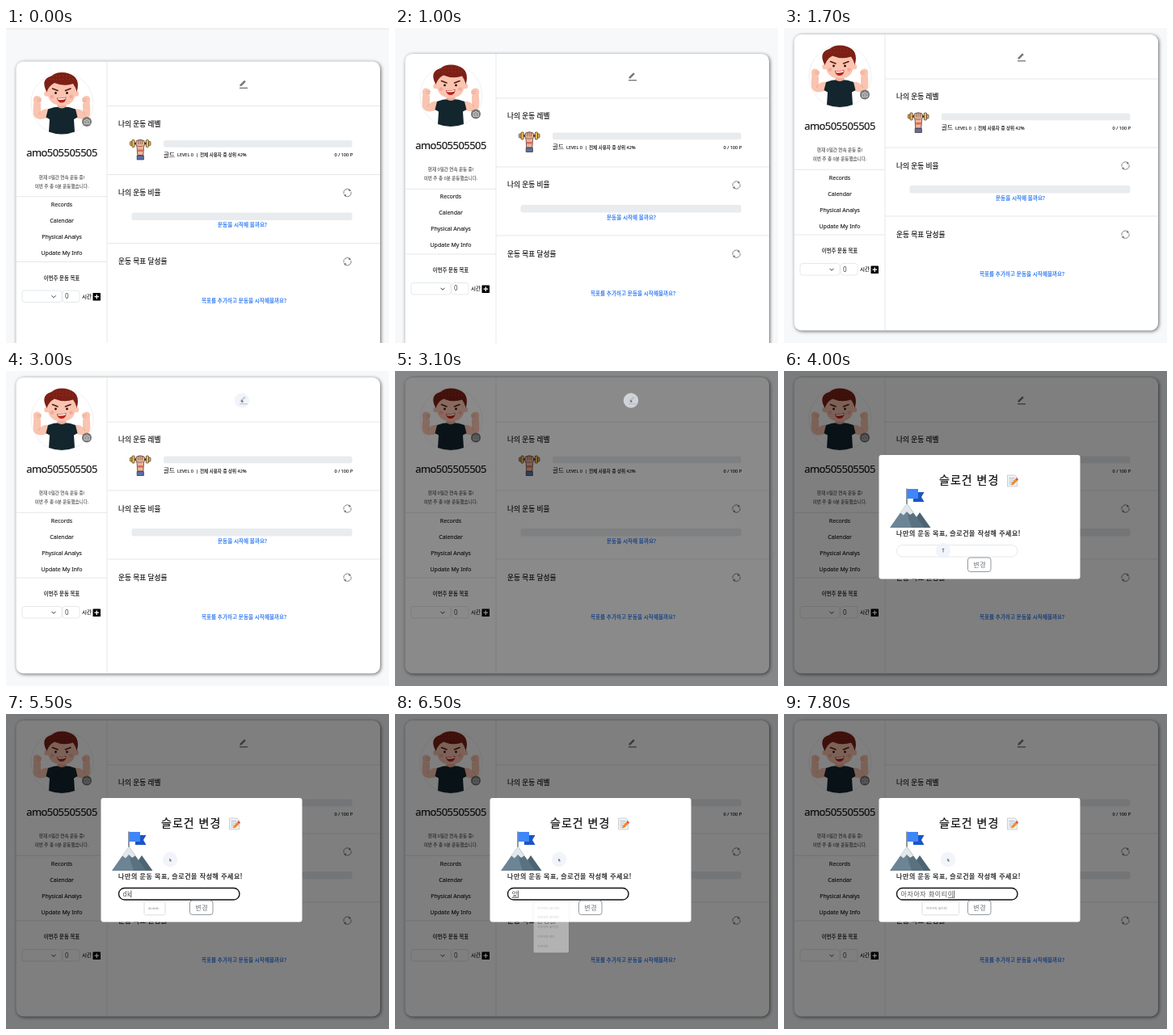
Write an HTML page that moves like this. It is 474 px wide and 390 px high and loops after 8000 ms.

```html
<!DOCTYPE html>
<html lang="ko">
<head>
<meta charset="utf-8">
<style>
  html, body { margin: 0; height: 100%; overflow: hidden; background: #f6f8fa; }
  svg { display: block; width: 474px; height: 390px; }
  text { font-family: "Noto Sans", "Noto Sans CJK KR", "Noto Sans CJK JP", sans-serif; fill: #111; white-space: pre; }
  .mid { text-anchor: middle; }
  .menu { font-size: 7px; stroke: #111; stroke-width: .1px; }
  .small { font-size: 5.55px; stroke: #111; stroke-width: .12px; }
  .note { font-size: 5.55px; stroke: #555; stroke-width: .1px; }
  .note text { fill: #555; }
  .head { font-size: 8.7px; font-weight: 500; stroke: #111; stroke-width: .15px; }
  .link { font-size: 6.6px; fill: #1a6cf0; stroke: #1a6cf0; stroke-width: .15px; }
  .bar { fill: #e9ecef; }
  .field { fill: #fff; stroke: #dee2e6; stroke-width: .8px; }
  .rule { fill: none; stroke: #e4e5e7; stroke-width: .9px; }
  .spaced { font-size: 8px; letter-spacing: .58px; }
  .hint { font-size: 3.6px; fill: #888; letter-spacing: .15px; }
</style>
</head>
<body>
<svg viewBox="0 0 474 390">
  <defs>
    <g id="refresh">
      <path d="M-4.500 1.200A4.600 4.600 0 0 1 2.900 -3.600M4.500 -1.200A4.600 4.600 0 0 1 -2.900 3.600" fill="none" stroke="#777" stroke-width=".9"/>
      <path d="M2.300 -5.200L4.800 -2.200L1.600 -1.900ZM-2.300 5.200L-4.800 2.200L-1.600 1.900Z" fill="#777"/>
    </g>
    <g id="arm">
      <path d="M35 55Q33 66 34 74Q37 81 46 79L55 77L54 67Q46 66 43 70L43 60Z" fill="#f9c4b0"/>
      <path d="M34 57Q33 51 38 50.500Q44 51 44 56Q43 60.500 38 60Q35 60 34 57Z" fill="#f9c4b0"/>
      <path d="M38 54.500h5.500M38.500 57h4.500M42.500 70q-2 1.500 -2 4" fill="none" stroke="#e59f8c" stroke-width=".7"/>
    </g>
    <g id="weight" fill="#eebc55" stroke="#3b2a22" stroke-width=".7">
      <rect x="153.500" y="107" width="2.500" height="5" rx="1"/>
      <rect x="156" y="105" width="3.200" height="9" rx="1"/>
    </g>
  </defs>

  <g id="page">
    <path class="rule" d="M0 -32.500H474"/>
    <rect x="12.500" y="8" width="450.500" height="366.500" rx="9" fill="#fff"
          style="filter:drop-shadow(1.200px 1.200px 2px rgba(0,0,0,.6))"/>
    <path class="rule" d="M125 8V374M12.500 175.300H125M12.500 256H125M125 63H463M125 148H463M125 233H463"/>

    <circle cx="69.500" cy="60" r="38.500" fill="#fff" stroke="#ececec" stroke-width=".8"/>
    <use href="#arm"/>
    <use href="#arm" transform="matrix(-1 0 0 1 138 0)"/>
    <path d="M52 67Q60 63.500 69 64Q78 63.500 86 67L88.500 77L84 79.500L85 95Q69 101 53 95L54 79.500L49.500 77Z" fill="#13252d"/>
    <path d="M63.500 57h11v7q-5.500 4 -11 0z" fill="#efae9a"/>
    <g fill="#f9c4b0">
      <circle cx="50.500" cy="48" r="3.200"/><circle cx="87" cy="48" r="3.200"/>
      <path d="M51.500 40Q53 30 69 30Q85 30 86 40V48Q84 62.500 69 62.500Q54 62.500 51.500 48Z"/>
    </g>
    <path d="M50.500 46Q42 30 56 26Q65 19 78 23Q93 28 87.500 46Q86.500 40 83 35.500Q72 39.500 60 34.500Q53 38 50.500 46Z" fill="#7c2016"/>
    <path d="M54 30H85M58 26H81" fill="none" stroke="#a8372a" stroke-dasharray="1 3" stroke-width=".9"/>
    <path d="M57.500 41.500l6.500 2.500M73.500 44l6.500 -2.500" fill="none" stroke="#5a1710" stroke-width="1.600" stroke-linecap="round"/>
    <g fill="#2b1512"><circle cx="61.500" cy="47" r="1.400"/><circle cx="75.500" cy="47" r="1.400"/></g>
    <g fill="#f6a89a"><circle cx="57" cy="51.500" r="2.300"/><circle cx="80.500" cy="51.500" r="2.300"/></g>
    <path d="M63 53q6 1 11.500 -1q0 6.500 -5.500 7q-5 0 -6 -6z" fill="#c0201c"/>
    <path d="M64 53.600q5 .8 9.800 -.8l-.3 1.700q-4.500 1.300 -9 .7z" fill="#fff"/>
    <circle cx="100" cy="82.500" r="6" fill="#777"/>
    <path d="M97 80.700h1.700l.7 -1.200h1.400l.7 1.200h1.700v4.600h-6.200z" fill="none" stroke="#fff" stroke-width=".7"/>
    <circle cx="100.100" cy="82.800" r="1.200" fill="none" stroke="#fff" stroke-width=".6"/>

    <text class="mid" x="69" y="125.700" font-size="13" letter-spacing="-.55" stroke="#111" stroke-width=".15">amo505505505</text>
    <g class="mid note">
      <text x="69" y="153">현재 0일간 연속 운동 중!</text>
      <text x="69" y="164">이번 주 총 0분 운동했습니다.</text>
    </g>
    <g class="mid menu">
      <text x="69" y="187.500">Records</text>
      <text x="69" y="207.500">Calendar</text>
      <text x="69" y="227.500">Physical Analys</text>
      <text x="69" y="247.500">Update My Info</text>
    </g>
    <text class="mid" x="69" y="278.300" font-size="6.400" stroke="#111" stroke-width=".15">이번주 운동 목표</text>
    <rect class="field" x="20" y="291.500" width="49" height="14.500" rx="3"/>
    <rect class="field" x="70" y="291.500" width="21" height="14.500" rx="3"/>
    <path d="M56.500 297.800l2.500 2.500l2.500 -2.500" fill="none" stroke="#343a40"/>
    <text x="73" y="301.500" font-size="8" style="fill:#444">0</text>
    <text x="94" y="301.400" font-size="6.500" stroke="#111" stroke-width=".12">시간</text>
    <rect x="107.500" y="294.500" width="9.500" height="9.500" rx=".6"/>
    <path d="M109.500 299.200h5.500M112.250 296.500v5.500" stroke="#fff" stroke-width="1.300"/>

    <path d="M289.500 38.500v-1.800l5.500 -5.400l1.800 1.800l-5.500 5.400z" fill="#777"/>
    <path d="M289 40.800h10" stroke="#666" stroke-width="1.200"/>

    <text class="head" x="139" y="88.300">나의 운동 레벨</text>
    <path d="M158 109.500h17" stroke="#3b2a22" stroke-width="2.500"/>
    <use href="#weight"/>
    <use href="#weight" transform="matrix(-1 0 0 1 332.500 0)"/>
    <path d="M161.500 106q4.500 -2.500 9.500 0q1.500 4 -.5 8l-.6 10h-7.200l-.6 -10q-2.400 -4 -.6 -8z" fill="#ecb59a" stroke="#3b2a22" stroke-width=".7"/>
    <path d="M163.800 105.500v5M166.200 105v5.500M168.600 105.500v5M162.500 112.500q3 1.500 7 0" fill="none" stroke="#3b2a22" stroke-width=".55"/>
    <path d="M162.700 117h7.200v2.500h-7.200z" fill="#d8695c"/>
    <path d="M162.200 124.500h8.200v5h-8.200z" fill="#5a6fa8" stroke="#3b2a22" stroke-width=".7"/>
    <rect class="bar" x="195" y="105.500" width="233.500" height="8.800" rx="2.500"/>
    <text x="195" y="126" font-size="7.600" stroke="#111" stroke-width=".12">골드</text>
    <g class="small">
      <text x="212" y="125.700">LEVEL 0  |</text>
      <text x="240" y="125.700">전체 사용자 중 상위 42%</text>
      <text x="429" y="125.700" text-anchor="end">0 / 100 P</text>
    </g>

    <text class="head" x="139" y="173.500">나의 운동 비율</text>
    <use href="#refresh" x="422.500" y="170.500"/>
    <rect class="bar" x="155.500" y="195" width="273" height="9.500" rx="2.500"/>
    <text class="mid link" x="292.500" y="212.600">운동을 시작해 볼까요?</text>

    <text class="head" x="139" y="258.700">운동 목표 달성률</text>
    <use href="#refresh" x="422.500" y="255.700"/>
    <text class="mid link" x="294.500" y="306.700">목표를 추가하고 운동을 시작해볼까요?</text>
  </g>

  <rect id="dim" width="474" height="390"/>

  <g id="modal">
    <rect x="117.500" y="104" width="249" height="153.500" rx="3" fill="#fff"/>
    <text x="192" y="140" font-size="14" letter-spacing="1.050" stroke="#111" stroke-width=".25">슬로건 변경</text>
    <path d="M276.500 129h9.500l2.500 2.500v11.500h-12z" fill="#f1f3f5" stroke="#b9c0c8" stroke-width=".7"/>
    <path d="M278.500 132.500h7M278.500 135h7M278.500 137.500h4M278.500 140h3" stroke="#8fa3b8" stroke-width=".7"/>
    <path d="M281 141.500l.8 -3l6 -6.300l2.300 2.200l-6 6.300z" fill="#f28c28"/>
    <path d="M286.500 133.500l1.300 -1.300l2.300 2.200l-1.300 1.300z" fill="#e0455e"/>

    <path d="M152 145.500V168" stroke="#54606b" stroke-width="1.300"/>
    <path d="M160 150h13.500l-3.500 6l3.500 6h-13.500z" fill="#1c55c4"/>
    <path d="M152.500 146h13.500v12h-13.500z" fill="#3f86fa"/>
    <path d="M155 194L168 175L181.500 194Z" fill="#4d6472"/>
    <path d="M131 194L152 164L173 194Z" fill="#6d8494"/>
    <path d="M152 164L173 194H158L154 182Z" fill="#5a7180"/>
    <path d="M152 164L160 175.500L156 178L152 174L148 178.500L144 175.500Z" fill="#e2e8ec"/>

    <text class="spaced" x="139" y="204.200" stroke="#111" stroke-width=".2">나만의 운동 목표, 슬로건을 작성해 주세요!</text>
    <rect id="input" x="139.500" y="215.500" width="149.500" height="14.500" rx="7.250" fill="#fff"/>
    <text id="typed" class="spaced" x="144.500" y="225.800" style="fill:#555"><tspan id="done"></tspan><tspan id="composing" text-decoration="underline"></tspan></text>
    <path id="caret" stroke="#222" stroke-width=".7"/>
    <rect x="227.500" y="231" width="28.500" height="17.500" rx="3" fill="#fff" stroke="#868e96" stroke-width=".9"/>
    <text class="spaced mid" x="242.200" y="242.800" style="fill:#6c757d">변경</text>
  </g>

  <g id="popup">
    <rect id="popupBox" x="171.500" y="232.500" rx="1" fill="#fff" style="filter:drop-shadow(0 .5px 1px rgba(0,0,0,.3))"/>
    <g id="hints"></g>
  </g>

  <g id="cursor">
    <circle r="9.200" fill="#ebf0fa" fill-opacity=".72"/>
    <path id="arrow" d="M-.8 -1.500L2.300 1.400L1 1.500L1.700 3L.8 3.300L.2 1.800L-.8 2.600Z" fill="#555" stroke="#fff" stroke-width=".3"/>
    <path id="beam" d="M-1.200 -2q1.200 0 1.200 .8q0 -.8 1.200 -.8M0 -1.500V2.500" fill="none" stroke="#444" stroke-width=".7"/>
  </g>
</svg>
<script>
  const LOOP = 8000, STEP = 100;
  const $ = id => document.getElementById(id);
  const set = (id, attrs) => { for (const key in attrs) $(id).setAttribute(key, attrs[key]); };
  const progress = (t, from, to) => Math.min(1, Math.max(0, (t - from) / (to - from)));
  const smooth = p => p * p * (3 - 2 * p);
  const latest = (list, t) => list.filter(([start]) => t >= start).pop();

  // [start, finished text, syllable being composed]
  const typing = [
    [0, '', ''], [4700, 'd', ''], [4900, 'dk', ''], [5600, 'd', ''], [5700, '', ''],
    [6200, '', 'ㅇ'], [6300, '', '아'], [6400, '', '앚'], [6600, '아', '자'],
    [6700, '아자', '아'], [6900, '아자', '앚'], [7000, '아자아', '자'], [7100, '아자아자 ', ''],
    [7400, '아자아자 ', '화'], [7500, '아자아자 ', '황'], [7600, '아자아자 화', '이'],
    [7700, '아자아자 화이', '티'], [7800, '아자아자 화이티', '이']
  ];
  // [start, opacity, width, hints]
  const history = ['아자아자 (화이팅)', '아자아자 화이팅!!', '아자아자 화이팅!', '아자아자 화이', '아자아자'];
  const popups = [
    [0, 0, 25, []], [4700, 1, 25, ['dkdkdk']], [5700, 1, 43.5, history],
    [6500, .4, 43.5, history], [6600, .15, 43.5, history], [6700, 0, 43.5, history],
    [7000, 1, 44.5, ['아자아자 화이팅!']]
  ];
  // [start, end, from, to]
  const moves = [
    [2200, 2900, [300, 250], [292, 36.5]],
    [3400, 3900, [292, 36.5], [197, 222]],
    [4300, 4700, [197, 222], [203, 180]]
  ];

  function drawCursor(t) {
    const [start, end, from, to] = latest(moves, t) || moves[0];
    const p = smooth(progress(t, start, end));
    const [x, y] = from.map((v, i) => v + (to[i] - v) * p);
    const overInput = y > 214 && t > 3400;
    set('cursor', { transform: `translate(${x} ${y})`, opacity: progress(t, 2100, 2500) });
    set('arrow', { opacity: overInput ? 0 : 1 });
    set('beam', { opacity: overInput ? 1 : 0 });
  }

  function drawInput(t) {
    const focused = t >= 4200;
    const [, done, composing] = latest(typing, t);
    set('input', { stroke: focused ? '#111' : '#dee2e6', 'stroke-width': focused ? 1.4 : .8 });
    $('done').textContent = done;
    $('composing').textContent = composing;
    const x = 144.5 + (done || composing ? $('typed').getComputedTextLength() : 0);
    set('caret', { d: `M${x} 218.5V227.5`, opacity: focused ? 1 : 0 });
  }

  function drawPopup(t) {
    const [, opacity, width, hints] = latest(popups, t);
    set('popup', { opacity });
    set('popupBox', { width, height: 4 + 11.8 * Math.max(1, hints.length) });
    $('hints').innerHTML = hints.map((hint, i) =>
      `<text class="hint" x="176" y="${241.5 + 11.8 * i}">${hint}</text>`).join('');
  }

  function draw(t) {
    const scroll = 33.5 * (1 - progress(t, 900, 1400)) ** 1.5;
    set('page', { transform: `translate(0 ${scroll})` });
    set('dim', { opacity: t < 3100 ? 0 : t < 3200 ? .46 : .5 });
    const slide = 1 - progress(t, 3100, 3400);
    set('modal', { transform: `translate(0 ${-23 * slide * slide})`, opacity: progress(t, 3100, 3300) });
    drawInput(t);
    drawPopup(t);
    drawCursor(t);
  }

  let shown = -1;
  const origin = performance.now();
  function tick() {
    const t = Math.floor(Math.max(0, performance.now() - origin) % LOOP / STEP) * STEP;
    if (t !== shown) draw(shown = t);
    requestAnimationFrame(tick);
  }
  tick();
</script>
</body>
</html>
```
